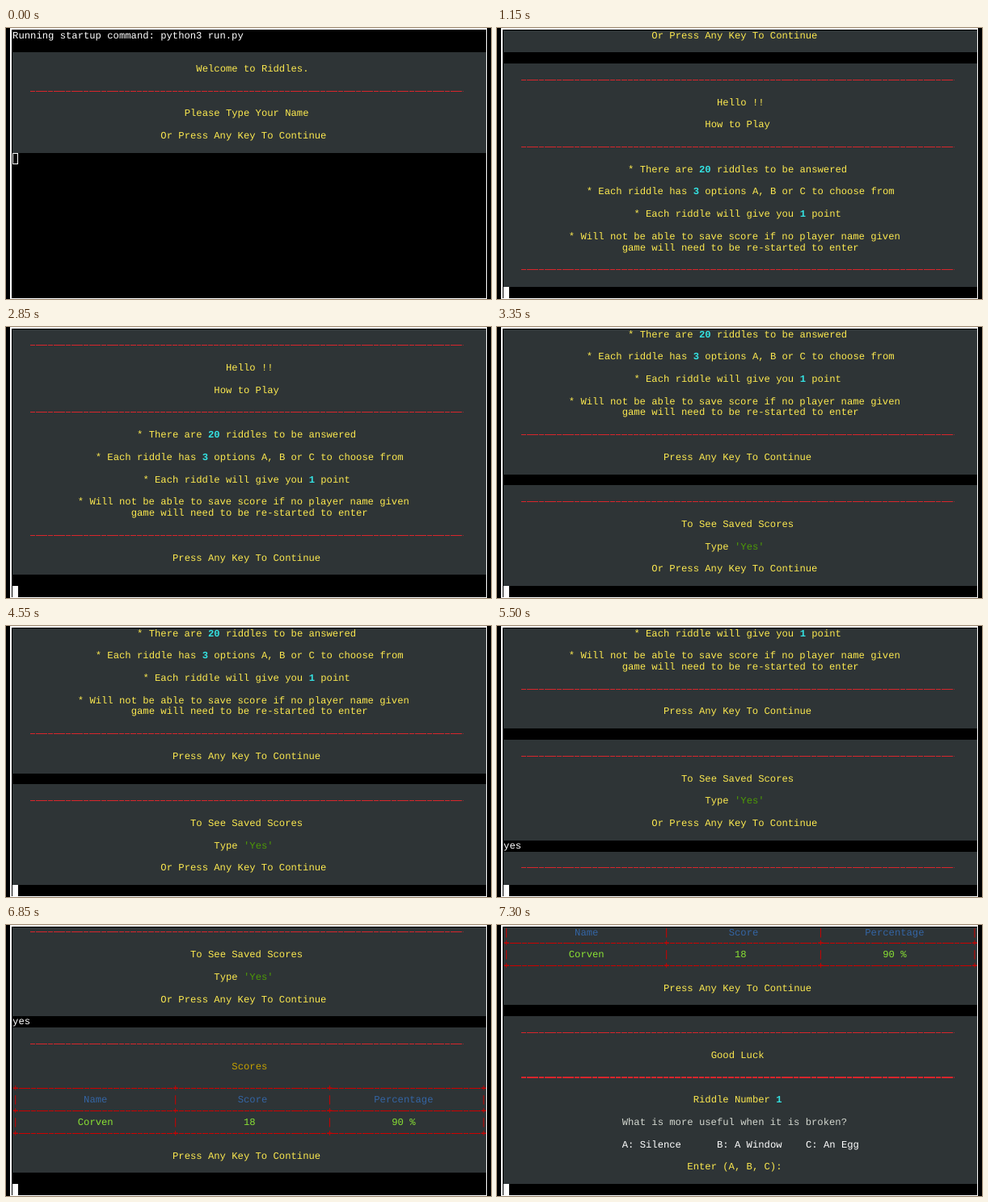
These frames come from a looping animation (600x336 px, 8000 ms). An HTML page:

```html
<!DOCTYPE html>
<html lang="en">
<head>
<meta charset="utf-8">
<title>Riddle terminal</title>
<style>
  :root { --cw: 7.331px; --rh: 13.85px; }
  html, body { margin: 0; width: 100%; height: 100%; overflow: hidden; background: #000; }
  #screen {
    position: absolute; left: 5px; top: 0; width: 590px; height: 336px; box-sizing: border-box;
    border: solid #fff; border-width: 2px 1px 1px 2px;
  }
  #term {
    position: absolute; left: 7.5px; top: 2.5px;
    width: calc(80 * var(--cw)); height: calc(24 * var(--rh));
    overflow: hidden; color: #fff; white-space: pre;
    font: 12.217px/13.85px "Liberation Mono", "Courier New", monospace;
    text-rendering: geometricPrecision;
    font-variant-ligatures: none;
  }
  #log { position: absolute; left: 0; top: 0; width: 100%; overflow: hidden; }
  #log > *, #prompt { position: absolute; }
  .panel { left: 0; width: 100%; background: #2e3436; }
  .text, #typed { transform: translate(0.6px, 0.8px); }
  .rule {
    height: 1.2px; transform: translateX(0.6px);
    background: repeating-linear-gradient(90deg, currentColor 0 6.6px, transparent 6.6px 7.331px);
  }
  #prompt { left: 0; height: var(--rh); }
  #typed { display: inline-block; }
  #cursor {
    position: absolute; left: 100%; top: 0; box-sizing: border-box;
    width: 7.6px; height: var(--rh); border: 1px solid #fff; background: #fff;
  }
  #cursor.hollow { background: none; }
</style>
</head>
<body>
<div id="screen"></div>
<div id="term">
  <div id="log"></div>
  <div id="prompt"><span id="typed"></span><i id="cursor"></i></div>
</div>
<script>
const CW = 7.331, RH = 13.85, ROWS = 24, LOOP = 8000;
const WHITE = '#fff', YELLOW = '#fce94f', CYAN = '#34e2e2', GREEN = '#4e9a06', LIME = '#8ae234',
      BLUE = '#3465a4', GOLD = '#c4a000', RED = '#cc0000', ROSE = '#d8262c', PALE = '#d3d7cf';
const $ = id => document.getElementById(id);
const log = $('log'), prompt = $('prompt'), typed = $('typed'), cursor = $('cursor');

function add(css, cls, text = '') {
  const el = document.createElement('div');
  el.className = cls;
  el.textContent = text;
  Object.assign(el.style, css);
  log.append(el);
}
const panel = (from, to) =>
  add({ top: from * RH + 'px', height: (to - from + 1) * RH + 'px' }, 'panel');
const put = (line, col, text, color = YELLOW, fontWeight = 400) =>
  add({ left: col * CW + 'px', top: line * RH + 'px', color, fontWeight }, 'text', text);
const rule = (line, col = 3, len = 73, color = ROSE) =>
  add({ left: col * CW + 'px', top: line * RH + 5.8 + 'px', width: len * CW + 'px', color }, 'rule');

// Text with one highlighted part between bars: "before|part|after"
function mark(line, col, text, color = CYAN, weight = 700) {
  text.split('|').forEach((part, i) => {
    if (i % 2) put(line, col, part, color, weight);
    else put(line, col, part);
    col += part.length;
  });
}

[[2, 10], [12, 33], [35, 43], [45, 57], [59, 73]].forEach(p => panel(...p));
[5, 13, 19, 30, 36, 46, 60, 64].forEach(line => rule(line));

put(0, 0, 'Running startup command: python3 run.py', WHITE);
put(3, 31, 'Welcome to Riddles.');
put(7, 29, 'Please Type Your Name');
put(9, 25, 'Or Press Any Key To Continue');

put(15, 36, 'Hello !!');
put(17, 34, 'How to Play');
mark(21, 21, '* There are |20| riddles to be answered');
mark(23, 14, '* Each riddle has |3| options A, B or C to choose from');
mark(25, 22, '* Each riddle will give you |1| point');
put(27, 11, '* Will not be able to save score if no player name given');
put(28, 20, 'game will need to be re-started to enter');
put(32, 27, 'Press Any Key To Continue');

put(38, 30, 'To See Saved Scores');
mark(40, 34, "Type |'Yes'|", GREEN, 400);
put(42, 25, 'Or Press Any Key To Continue');
put(44, 0, 'yes', WHITE);

put(48, 37, 'Scores', GOLD);
const edges = [0, 27, 53, 79];
for (let line = 50; line <= 54; line++) {
  const border = line % 2 === 0;
  if (border) rule(line, 0, 80, RED);
  edges.forEach(col => put(line, col, border ? '+' : '|', RED));
}
put(51, 12, 'Name', BLUE);
put(51, 38, 'Score', BLUE);
put(51, 61, 'Percentage', BLUE);
put(53, 11, 'Corven', LIME);
put(53, 39, '18', LIME);
put(53, 64, '90 %', LIME);
put(56, 27, 'Press Any Key To Continue');

put(62, 35, 'Good Luck');
mark(66, 32, 'Riddle Number |1|');
put(68, 20, 'What is more useful when it is broken?', PALE);
put(70, 20, 'A: Silence', WHITE);
put(70, 36, 'B: A Window', WHITE);
put(70, 51, 'C: An Egg', WHITE);
put(72, 31, 'Enter (A, B, C):');

// time in ms, line of the cursor, typed text
const steps = [
  [0, 11, ''], [250, 11, ''], [300, 12, ''],
  [1150, 32, ''], [1200, 34, ''],
  [2850, 35, ''], [3250, 44, ''],
  [4600, 44, 'y'], [4700, 44, 'ye'], [4850, 44, 'yes'],
  [4950, 45, ''], [5250, 48, ''],
  [5800, 58, ''], [6650, 59, ''], [7000, 74, '']
];

let shown = -1;
function show(i) {
  if (i === shown) return;
  shown = i;
  const [, line, text] = steps[i];
  const scroll = Math.max(0, line - ROWS + 1);
  log.style.height = line * RH + 'px';
  log.style.top = -scroll * RH + 'px';
  prompt.style.top = (line - scroll) * RH + 'px';
  typed.textContent = text;
  cursor.className = i === 0 ? 'hollow' : '';
}

const start = performance.now();
function frame() {
  const t = (performance.now() - start) % LOOP;
  show(steps.findLastIndex(s => s[0] <= t));
  requestAnimationFrame(frame);
}
frame();
</script>
</body>
</html>
```
